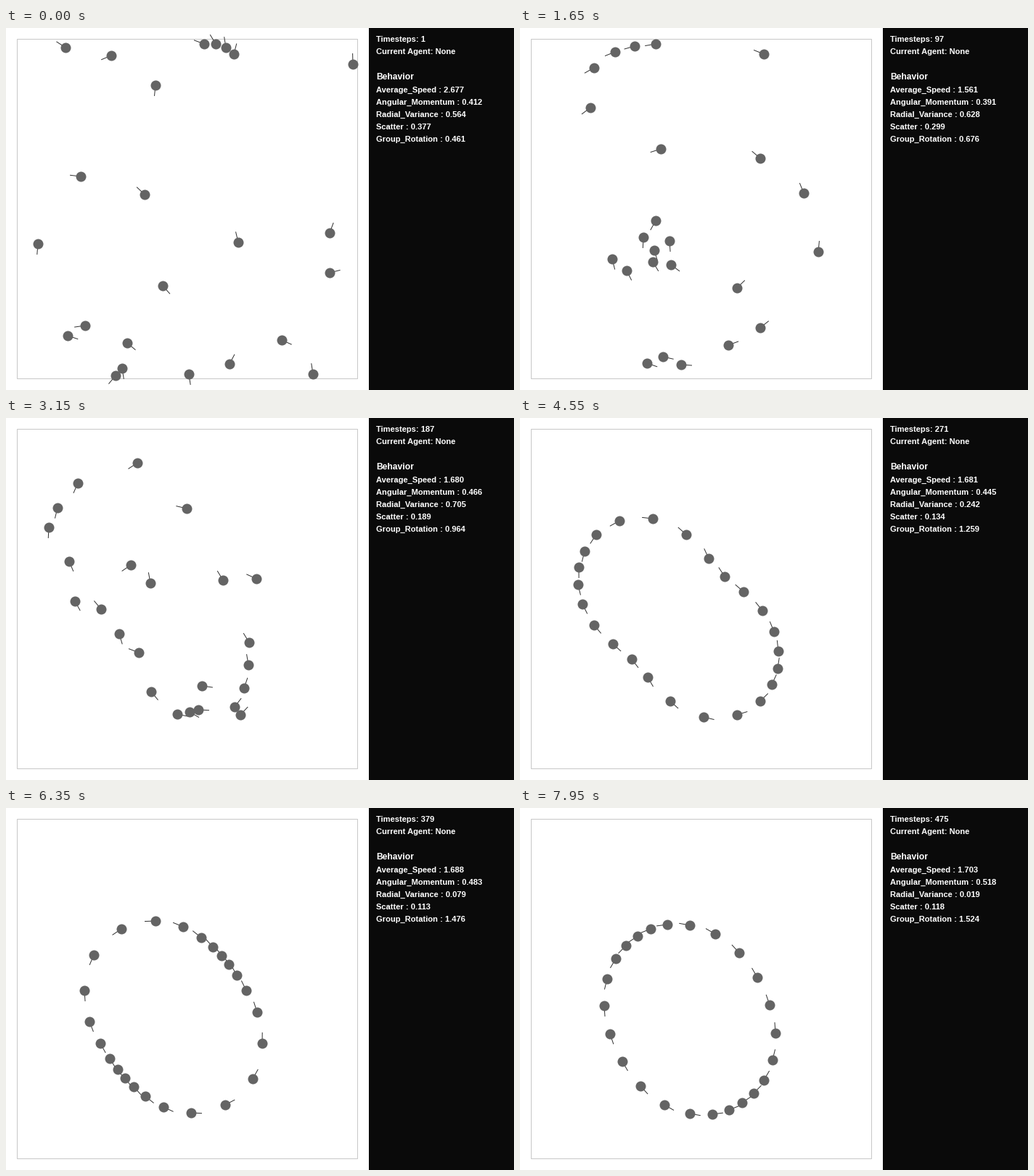
A matplotlib script for the animation above (8000 ms loop, 700 px wide and 500 px high).

```python
import numpy as np
import matplotlib.pyplot as plt
from matplotlib.animation import FuncAnimation
from matplotlib.collections import LineCollection
from matplotlib.patches import Rectangle

W, H, DPI = 700, 500, 100
FRAMES, INTERVAL = 160, 50
STEPS_PER_FRAME = 3
RADIUS, WHISKER = 7, 15
PX = 72 / DPI           # points per pixel

SPEED = 1.85            # pixels per step
SPIN = np.radians(0.73)  # ring rotation per step
CENTRE = 234 + 292j     # plane points are x + y*j, y pointing down
GATHER, MILL, END = 97, 271, 475    # steps where the swarm changes phase

# start and gathering point of every agent, in ring order
AGENTS = np.array([
    (206 + 79j, 187 + 266j), (44 + 298j, 183 + 323j), (103 + 205j, 127 + 319j),
    (191 + 230j, 147 + 335j), (320 + 296j, 170 + 289j), (308 + 464j, 197 + 454j),
    (109 + 411j, 175 + 463j), (151 + 480j, 222 + 465j), (160 + 470j, 287 + 438j),
    (252 + 478j, 331 + 414j), (380 + 431j, 411 + 309j), (423 + 478j, 299 + 359j),
    (216 + 356j, 206 + 294j), (446 + 338j, 391 + 228j), (478 + 50j, 336 + 36j),
    (314 + 36j, 187 + 22j), (85 + 425j, 185 + 307j), (303 + 27j, 158 + 25j),
    (289 + 22j, 131 + 33j), (446 + 283j, 331 + 180j), (167 + 435j, 208 + 327j),
    (273 + 22j, 102 + 55j), (82 + 27j, 97 + 110j), (145 + 38j, 194 + 167j),
])
start, gather = AGENTS.T

# nearly even spacing, bunched twice around the ring
index = np.arange(len(start))
phase = np.radians(77 + 15 * index + 13 * np.cos(index * np.pi / 6))


def unit(z):
    return z / (np.abs(z) + 1e-9)


def ring(step):
    """Stretched mill that rounds out while it rotates."""
    age = (step - MILL) / (END - MILL)
    skew = (1 - age) ** 2
    theta = phase + SPIN * (step - END)
    axis = np.radians(135 - 17 * age)
    r = 123 + (13 + 25 * skew) * np.cos(2 * (theta - axis))
    return CENTRE - 16 * (1 + 1j) * skew + r * np.exp(-1j * theta)


def hermite(p, q, head_p, head_q, step, first, last):
    """Curve from p to q whose pull reflects the distance travelled."""
    u = (step - first) / (last - first)
    pull = (SPEED * (last - first) + np.abs(q - p)) / 2
    return (p + (3 * u**2 - 2 * u**3) * (q - p)
            + pull * ((u**3 - 2 * u**2 + u) * head_p + (u**3 - u**2) * head_q))


# the shorter the way to the gathering point, the wider the left turn
slack = np.clip(1 - np.abs(gather - start) / (SPEED * GATHER), 0, 1)
start_head = unit(gather - start) * np.exp(3.2j * np.sqrt(slack))
gather_head = unit(-1j * (gather - CENTRE))
mill = ring(MILL)
mill_head = unit(ring(MILL + 0.1) - mill)


def place(step):
    if step < GATHER:
        return hermite(start, gather, start_head, gather_head, step, 1, GATHER)
    if step < MILL:
        return hermite(gather, mill, gather_head, mill_head, step, GATHER, MILL)
    return ring(step)


def xy(z):
    return np.stack([z.real, z.imag], axis=-1)


# readings at these steps, eased linearly in between
READ_STEPS = [1, 97, 187, 271, 328, 427, 475]
METRICS = {
    "Average_Speed": [2.677, 1.561, 1.680, 1.681, 1.677, 1.698, 1.703],
    "Angular_Momentum": [0.412, 0.391, 0.466, 0.445, 0.468, 0.497, 0.518],
    "Radial_Variance": [0.564, 0.628, 0.705, 0.242, 0.126, 0.034, 0.019],
    "Scatter": [0.377, 0.299, 0.189, 0.134, 0.117, 0.110, 0.118],
    "Group_Rotation": [0.461, 0.676, 0.964, 1.259, 1.434, 1.515, 1.524],
}

fig = plt.figure(figsize=(W / DPI, H / DPI), dpi=DPI, facecolor="white")
ax = fig.add_axes([0, 0, 1, 1])
ax.set_xlim(0, W)
ax.set_ylim(H, 0)
ax.axis("off")

ax.add_patch(Rectangle((15, 15), 469, 469, fill=False, ec="#c8c8c8", lw=PX))
ax.add_patch(Rectangle((500, 0), 200, 500, fc="#0a0a0a", lw=0))

whiskers = LineCollection([], colors="#323232", linewidths=PX, zorder=2)
ax.add_collection(whiskers)
bodies, = ax.plot([], [], "o", color="#646464", ms=2 * RADIUS * PX, mew=0,
                  antialiased=False, snap=False, zorder=3)


def label(y, text="", size=11.1):
    return ax.text(510, y, text, color="white", family="Liberation Sans",
                   weight="bold", size=size * PX, va="baseline", zorder=4)


timer = label(19)
label(36, "Current Agent: None")
label(71, "Behavior", 12.1)
readouts = {name: label(89 + 17 * k) for k, name in enumerate(METRICS)}


def draw(frame):
    step = 1 + STEPS_PER_FRAME * max(0, frame - 1)
    z = place(step)
    head = xy(unit(place(step + 0.1) - z))
    pos = np.clip(np.round(xy(z)), 22, 480)
    bodies.set_data(pos[:, 0], pos[:, 1])
    whiskers.set_segments(np.stack([pos, pos + WHISKER * head], axis=1))
    timer.set_text(f"Timesteps: {step}")
    for name, text in readouts.items():
        value = np.interp(step, READ_STEPS, METRICS[name])
        text.set_text(f"{name} : {value:.3f}")
    return [bodies, whiskers, timer, *readouts.values()]


anim = FuncAnimation(fig, draw, frames=FRAMES, interval=INTERVAL,
                     repeat=True, repeat_delay=0, cache_frame_data=False)
plt.show()
```
